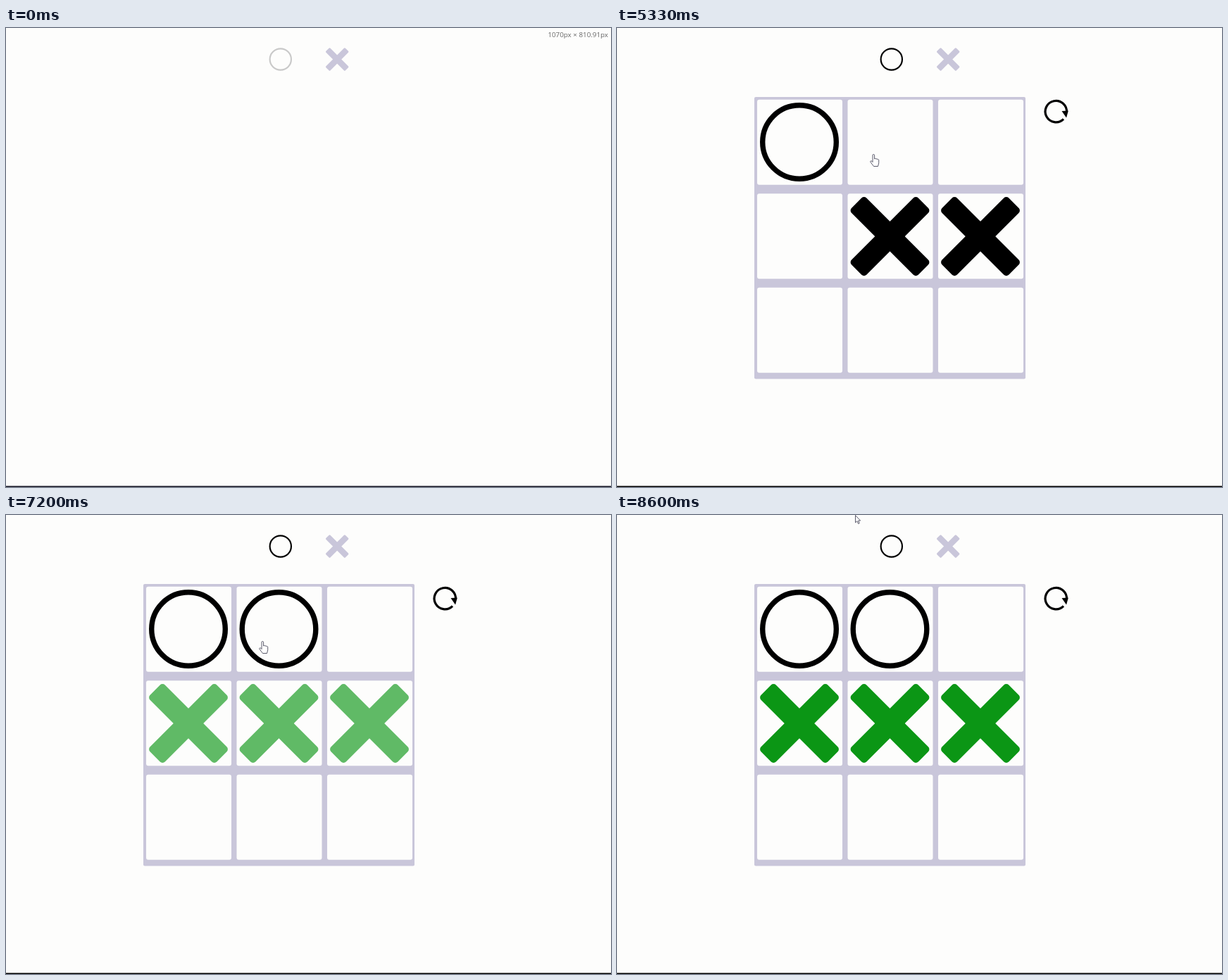
An HTML page for the animation above (9170 ms loop, 859 px wide and 652 px high).

```html
<!DOCTYPE html>
<html lang="en">
<head>
<meta charset="utf-8">
<title>Tic-tac-toe</title>
<style>
  html, body { margin: 0; width: 100%; height: 100%; overflow: hidden; background: #fdfdfc; }
  svg { display: block; width: 859px; height: 652px; }

  :root { --lav: #c9c6da; --win: #0b9615; }
  .anim { animation: 9170ms step-end infinite; }
  .linear { animation-timing-function: linear; }

  #label { animation-name: label; font: 9.8px "Open Sans", sans-serif; fill: #666; text-anchor: end; }
  #edge { animation-name: edge; }
  #pickO { animation-name: pickO; }
  #pickX { animation-name: pickX; }
  #board { animation-name: board; }
  #centre { animation-name: centre; }
  #corner { animation-name: corner; }
  #right { animation-name: right; }
  #top { animation-name: top; }
  #left { animation-name: left; }
  #row { animation-name: win; }
  #arrow { animation-name: arrow; }
  #hand { animation-name: hand; }

  @keyframes label { 0% { opacity: 1 } 8.397%, to { opacity: 0 } }
  @keyframes edge { 0% { fill: #151525 } 8.397%, to { fill: #000 } }

  /* turn markers */
  @keyframes pickO {
    0%, 8.39% { color: #c9c9c9 }
    8.4%, 20.029% { color: var(--lav) }
    21.483%, to { color: #000 }
  }
  @keyframes pickX {
    0%, 17.448% { color: var(--lav) }
    18.539%, 20.029% { color: #000 }
    21.483%, to { color: var(--lav) }
  }

  /* board and moves */
  @keyframes board { 0% { opacity: 0 } 23.228% { opacity: .5 } 23.991%, to { opacity: 1 } }
  @keyframes centre { 0% { opacity: 0 } 28.026%, to { opacity: 1 } }
  @keyframes corner { 0% { opacity: 0 } 44.384%, to { opacity: 1 } }
  @keyframes right { 0% { opacity: 0 } 47.983%, to { opacity: 1 } }
  @keyframes top { 0% { opacity: 0 } 61.832%, to { opacity: 1 } }
  @keyframes left { 0% { opacity: 0 } 65.103%, to { opacity: 1 } }

  /* winning row blinks */
  @keyframes win {
    0%, 70.11% { color: #000; opacity: 1 }
    70.12% { color: var(--win); opacity: 1 }
    71.21% { opacity: 0 }
    76.663% { opacity: 1 }
    81.952% { opacity: 0 }
    87.568%, to { color: var(--win); opacity: 1 }
  }

  /* pointer */
  @keyframes arrow {
    0% { opacity: 0; transform: translate(400px, 652px) }
    8.397% { opacity: 1; transform: translate(400px, 640px); animation-timing-function: steps(7) }
    10.905% { opacity: 1; transform: translate(356px, 67px) }
    13.413% { opacity: 0; transform: translate(456px, 48px) }
    23.228% { opacity: 1; transform: translate(456px, 48px) }
    39.586% { opacity: 0; transform: translate(338px, 0) }
    93.784%, to { opacity: 1; transform: translate(338px, 0) }
  }
  @keyframes hand {
    0% { opacity: 0; transform: translate(383px, 54px) }
    13.413% { opacity: 1; transform: translate(383px, 54px) }
    15.594% { opacity: 1; transform: translate(440px, 54px) }
    17.448% { opacity: 1; transform: translate(451px, 50px) }
    23.228% { opacity: 0; transform: translate(257px, 140px) }
    39.586% { opacity: 1; transform: translate(257px, 140px) }
    58.124% { opacity: 1; transform: translate(359px, 179px) }
    93.784%, to { opacity: 0; transform: translate(359px, 179px) }
  }
</style>
</head>
<body>
<svg viewBox="0 0 859 652">
  <defs>
    <g id="x" fill="currentColor">
      <rect x="-67" y="-15" width="134" height="30" rx="5" transform="rotate(45)"/>
      <rect x="-67" y="-15" width="134" height="30" rx="5" transform="rotate(-45)"/>
    </g>
    <circle id="o" r="52.3" fill="none" stroke="currentColor" stroke-width="7.4"/>
    <rect id="cell" width="121" height="121" rx="3" fill="#fdfdfc"/>
    <g id="cells">
      <use href="#cell" x="199"/>
      <use href="#cell" x="327.5"/>
      <use href="#cell" x="456"/>
    </g>
  </defs>

  <rect id="edge" class="anim" y="650.5" width="859" height="1.5"/>
  <text id="label" class="anim" x="855" y="13">1070px × 810.91px</text>

  <g id="pickO" class="anim linear"><use href="#o" transform="translate(389.8 44.5) scale(.29)"/></g>
  <g id="pickX" class="anim linear"><use href="#x" transform="translate(470.2 44.5) scale(.29)"/></g>

  <g id="board" class="anim">
    <rect x="195" y="98" width="385" height="400.5" rx="2" fill="#c9c6da"/>
    <use href="#cells" y="101.7"/>
    <use href="#cells" y="235.3"/>
    <use href="#cells" y="368.8"/>
    <path d="M634 129.4A15.2 15.2 0 1 1 638.4 120" fill="none" stroke="#000" stroke-width="3.2"/>
    <path d="M631.5 118L640.8 117.6L638 127.6Z"/>
  </g>

  <g id="corner" class="anim"><use href="#o" x="259" y="162"/></g>
  <g id="top" class="anim"><use href="#o" x="387.5" y="162"/></g>
  <g id="row" class="anim linear">
    <g id="left" class="anim"><use href="#x" x="259" y="296"/></g>
    <g id="centre" class="anim"><use href="#x" x="387.5" y="296"/></g>
    <g id="right" class="anim"><use href="#x" x="516" y="296"/></g>
  </g>

  <g fill="#fff" stroke="#4a4a5c" stroke-width=".9" stroke-linejoin="round">
    <path id="arrow" class="anim" d="M.5 .5V10.8L2.9 8.7L4.6 12.4L6.2 11.7L4.6 8H7.6Z"/>
    <path id="hand" class="anim" d="M4 10V1.8a1.3 1.3 0 0 1 2.6 0V7c.5-1 2.2-.8 2.3.3.5-.8 2-.6 2.1.5.6-.6 1.7-.3 1.7.8v4.2L11.5 17.5H5.5L1 11.5C.3 10 1.8 9.2 2.8 10.2L4 11.5Z"/>
  </g>
</svg>
</body>
</html>
```
